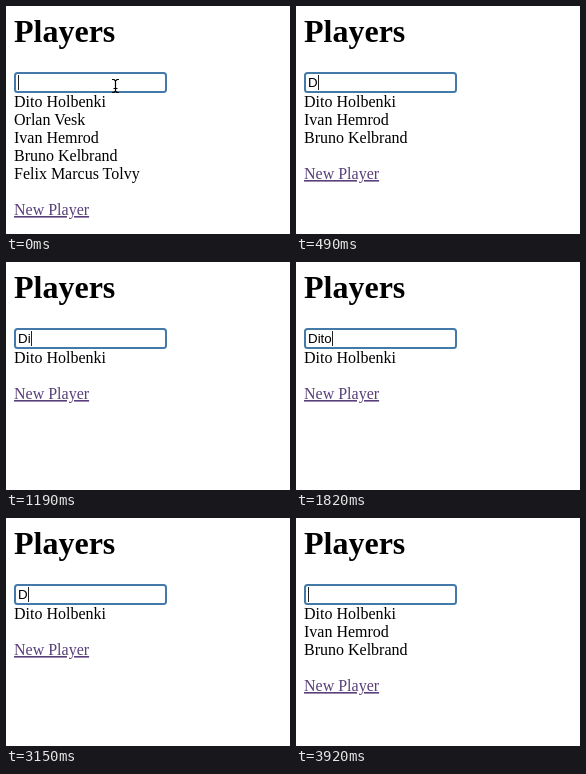
These frames come from a looping animation (284x228 px, 4.2 s). An HTML page:

```html
<!DOCTYPE html>
<html lang="en">
<head>
<meta charset="utf-8">
<title>Players</title>
<style>
html, body { margin: 0; width: 100%; height: 100%; overflow: hidden; background: #fff; }
svg { display: block; font: 16px "Liberation Serif", "Times New Roman", serif; }
.heading { font-size: 32px; font-weight: bold; }
.typed { font: 13.333px "Liberation Sans", Arial, sans-serif; }
.field { fill: #fff; stroke: #437aa9; stroke-width: 2; }
.link { fill: #59407a; text-decoration: underline; }
.pointer { fill: none; stroke: #000; stroke-width: 1.2; }
</style>
</head>
<body>
<svg width="284" height="228" viewBox="0 0 284 228">
  <text class="heading" x="8" y="36">Players</text>
  <rect class="field" x="9" y="67" width="151" height="19" rx="2.5"/>
  <text class="typed" id="typed" x="12" y="81"></text>
  <rect id="caret" y="69" width="1" height="15" fill="#222"/>
  <g id="list"></g>
  <text class="link" id="link" x="8">New Player</text>
  <path class="pointer" id="pointer" d="M-3.5 -6.5H-1.5L0 -5L1.5 -6.5H3.5M0 -5V5M-3.5 6.5H-1.5L0 5L1.5 6.5H3.5M-2 2.5H2"/>
</svg>
<script>
const LOOP = 4200;
const WORD = "Dito";
const ROW = 18;
const FIRST_BASELINE = 101;
const players = ["Dito Holbenki", "Orlan Vesk", "Ivan Hemrod", "Bruno Kelbrand", "Felix Marcus Tolvy"];

// Each track lists [start time, value]; values hold until the next entry.
const typedLength = [[0, 0], [280, 1], [840, 2], [1540, 3], [1820, 4], [2590, 3], [2870, 2], [3150, 1], [3920, 0]];
const queryLength = [[0, 0], [490, 1], [1120, 2], [3360, 1]];
const caretShown = [[0, true], [1400, false], [1540, true], [2380, false], [2870, true], [3360, false], [3920, true]];
const pointerHidden = 280;

const valueAt = (track, time) => track.filter(([start]) => start <= time).pop()[1];
const byId = id => document.getElementById(id);
const [typed, caret, list, link, pointer] = ["typed", "caret", "list", "link", "pointer"].map(byId);
pointer.setAttribute("transform", "translate(109.5 80)");

const rows = players.map(name => {
  const row = document.createElementNS("http://www.w3.org/2000/svg", "text");
  row.textContent = name;
  row.setAttribute("x", 8);
  list.append(row);
  return row;
});

const show = (element, visible) => element.setAttribute("visibility", visible ? "visible" : "hidden");

function drawList(query) {
  let baseline = FIRST_BASELINE;
  rows.forEach((row, i) => {
    const matches = players[i].toLowerCase().includes(query.toLowerCase());
    show(row, matches);
    if (!matches) return;
    row.setAttribute("y", baseline);
    baseline += ROW;
  });
  link.setAttribute("y", baseline + ROW);
}

function draw(time) {
  const length = valueAt(typedLength, time);
  typed.textContent = WORD.slice(0, length);
  caret.setAttribute("x", Math.round(12 + (length ? typed.getComputedTextLength() : 0)));
  show(caret, valueAt(caretShown, time));
  drawList(WORD.slice(0, valueAt(queryLength, time)));
  show(pointer, time < pointerHidden);
}

const start = performance.now();
function tick() {
  draw((performance.now() - start) % LOOP);
  requestAnimationFrame(tick);
}
tick();
</script>
</body>
</html>
```
